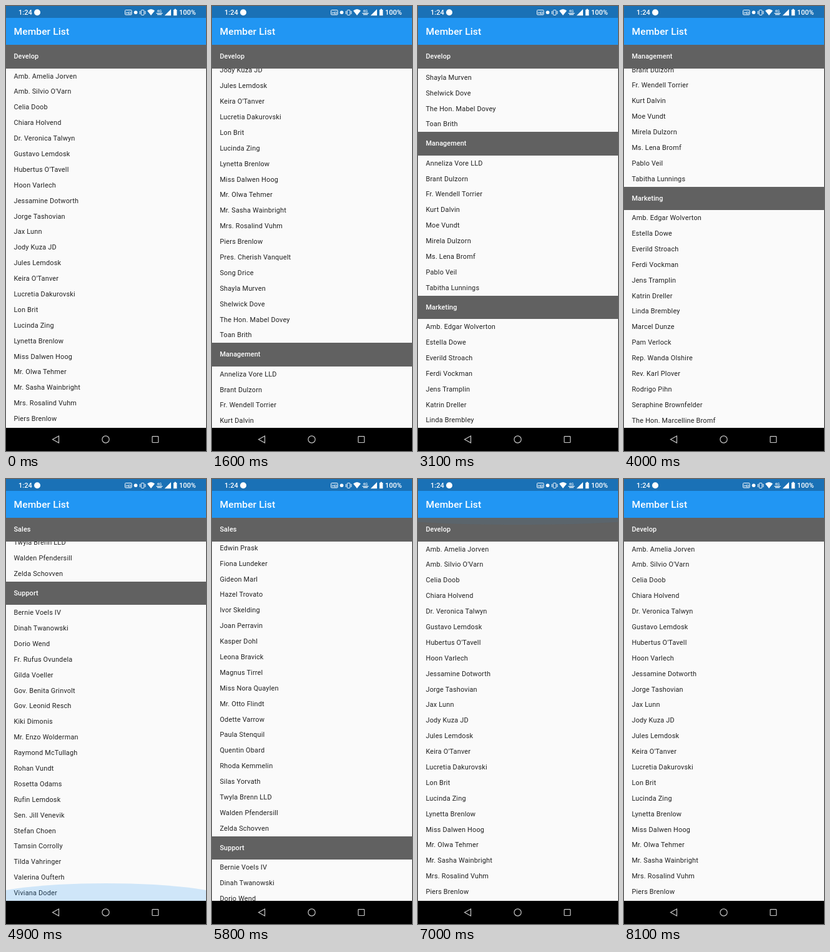
Animation of 320 by 711 pixels, one loop 8200 ms. Source, as an HTML page:

```html
<!DOCTYPE html>
<html lang="en">
<head>
<meta charset="utf-8">
<title>Member List</title>
<style>
html, body { margin: 0; width: 100%; height: 100%; overflow: hidden; background: #000; }
body { position: relative; font: 10.89px Roboto, sans-serif; }
#app { position: absolute; inset: 0 auto auto 0; width: 320px; height: 711px; overflow: hidden; }
#status { height: 18.67px; background: #1a71b6; }
h1 { margin: 0; padding-left: 12.45px; height: 43.56px; background: #2196f3; color: #fff;
  font-size: 15.56px; font-weight: 500; line-height: 44.5px; letter-spacing: .12px; }
#view { position: absolute; top: 62.2px; width: 320px; height: 611.5px; overflow: hidden; background: #fafafa; }
#list { height: 100%; overflow: hidden; color: #212121; letter-spacing: .19px; }
h2 { position: sticky; top: 0; margin: 0; padding-left: 12.45px; height: 37.35px; line-height: 37.8px;
  background: #616161; color: #fff; font-size: 10.89px; font-weight: 500; letter-spacing: .08px; }
p { margin: 0; padding-left: 12.45px; height: 24.9px; line-height: 25.6px; white-space: nowrap; }
.glow { position: absolute; left: -12.5%; width: 125%; background: rgba(33, 150, 243, .2); }
#low { bottom: 0; border-radius: 50% 50% 0 0 / 100% 100% 0 0; }
#high { top: 0; border-radius: 0 0 50% 50% / 0 0 100% 100%; }
svg { position: absolute; inset: 0; }
</style>
</head>
<body>
<div id="app">
  <div id="status"></div>
  <h1>Member List</h1>
  <div id="view">
    <div id="list"></div>
    <div id="low" class="glow"></div>
    <div id="high" class="glow"></div>
  </div>
  <svg width="320" height="711" fill="#fff" font-family="Roboto, sans-serif" font-size="11" font-weight="500">
    <text x="20" y="14.3">1:24</text>
    <circle cx="50" cy="10.3" r="5"/>
    <g fill="none" stroke="#fff">
      <rect x="190.5" y="6.5" width="10.5" height="7.5" rx="1"/>
      <rect x="216.3" y="6.5" width="4.6" height="8" rx="1"/>
      <path d="M214.3 8v5M222.9 8v5"/>
    </g>
    <text x="192" y="12.6" font-size="6">HD</text>
    <circle cx="207.5" cy="10.3" r="2.8"/>
    <path d="M226 7.5Q232 2.5 238 7.5L232 15Z"/>
    <text x="241.5" y="9.5" font-size="6">4G</text>
    <path d="M240.5 11h10v1.2h-10zM242 13h7v1.2h-7z"/>
    <path d="M264 5V15.3H253.7ZM268 6h1.4v-1.2h2.6v1.2h1.4v9.3h-5.4z"/>
    <text x="277" y="14.3">100%</text>
    <g fill="none" stroke="#c8c8c8" stroke-width="1.2">
      <path d="M84.5 687v11L74.5 692.5Z"/>
      <circle cx="159.5" cy="692.5" r="5.6"/>
      <rect x="234" y="687.7" width="9.8" height="9.8" rx=".8"/>
    </g>
  </svg>
</div>
<script>
const teams = {
  Develop: `Amb. Amelia Jorven,Amb. Silvio O'Varn,Celia Doob,Chiara Holvend,Dr. Veronica Talwyn,Gustavo Lemdosk,
    Hubertus O'Tavell,Hoon Varlech,Jessamine Dotworth,Jorge Tashovian,Jax Lunn,Jody Kuza JD,Jules Lemdosk,
    Keira O'Tanver,Lucretia Dakurovski,Lon Brit,Lucinda Zing,Lynetta Brenlow,Miss Dalwen Hoog,Mr. Olwa Tehmer,
    Mr. Sasha Wainbright,Mrs. Rosalind Vuhm,Piers Brenlow,Pres. Cherish Vanquelt,Song Drice,Shayla Murven,
    Shelwick Dove,The Hon. Mabel Dovey,Toan Brith`,
  Management: `Anneliza Vore LLD,Brant Dulzorn,Fr. Wendell Torrier,Kurt Dalvin,Moe Vundt,Mirela Dulzorn,
    Ms. Lena Bromf,Pablo Veil,Tabitha Lunnings`,
  Marketing: `Amb. Edgar Wolverton,Estella Dowe,Everild Stroach,Ferdi Vockman,Jens Tramplin,Katrin Dreller,
    Linda Brembley,Marcel Dunze,Pam Verlock,Rep. Wanda Olshire,Rev. Karl Plover,Rodrigo Pihn,
    Seraphine Brownfelder,The Hon. Marcelline Bromf,Tobin Marrowell,Una Grasdale,Vernon Pilk`,
  Sales: `Abner Tolvick,Alma Grenning,Basil Oftedahl,Bianca Murrel,Cedric Vonn,Clara Wimbley,Dr. Dora Haskelow,
    Edwin Prask,Fiona Lundeker,Gideon Marl,Hazel Trovato,Ivor Skelding,Joan Perravin,Kasper Dohl,Leona Bravick,
    Magnus Tirrel,Miss Nora Quaylen,Mr. Otto Flindt,Odette Varrow,Paula Stenquil,Quentin Obard,Rhoda Kemmelin,
    Silas Yorvath,Twyla Brenn LLD,Walden Pfendersill,Zelda Schovven`,
  Support: `Bernie Voels IV,Dinah Twanowski,Dorio Wend,Fr. Rufus Ovundela,Gilda Voeller,Gov. Benita Grinvolt,
    Gov. Leonid Resch,Kiki Dimonis,Mr. Enzo Wolderman,Raymond McTullagh,Rohan Vundt,Rosetta Odams,Rufin Lemdosk,
    Sen. Jill Venevik,Stefan Choen,Tamsin Corrolly,Tilda Vahringer,Valerina Oufterh,Viviana Doder`
};
const LOOP = 8200;
const $ = id => document.getElementById(id);
const list = $('list');

list.innerHTML = Object.entries(teams).map(([team, names]) =>
  `<section><h2>${team}</h2>${names.split(',').map(n => `<p>${n.trim()}</p>`).join('')}</section>`).join('');
const bottom = el => el.getBoundingClientRect().bottom;
const end = Math.floor(bottom(list.lastChild) - bottom(list));

// Each swipe: a finger drag, then a fling that slows by friction.
const swipes = [
  { start: 1150, release: 1350, from: 0, drag: 122.6, fling: 510, time: 2150 },
  { start: 3720, release: 4000, from: 630, drag: 162, fling: 2186, time: 3200 },
  { start: 5450, release: 5700, from: end, drag: -170, fling: -2380, time: 3000 }
];

const clamp = (v, lo, hi) => Math.min(hi, Math.max(lo, v));
const friction = u => ((1.2 * u - 3.27) * u + 3.065) * u;

function scrollAt(t) {
  const s = swipes.findLast(s => t >= s.start);
  if (!s) return 0;
  const pull = clamp((t - s.start) / (s.release - s.start), 0, 1);
  const glide = clamp((t - s.release) / s.time, 0, 1);
  return clamp(s.from + s.drag * pull ** 1.3 + s.fling * friction(glide), 0, end);
}

function glow(id, t, hit) {
  const u = (t - hit) / 700;
  const k = clamp(Math.min(u / .14, (1 - u) / .86), 0, 1) ** 2;
  $(id).style.height = 28 * k + 'px';
  $(id).style.opacity = k;
}

function draw() {
  const t = performance.now() % LOOP;
  list.scrollTop = scrollAt(t);
  glow('low', t, 4800);
  glow('high', t, 6940);
  requestAnimationFrame(draw);
}
draw();
</script>
</body>
</html>
```
